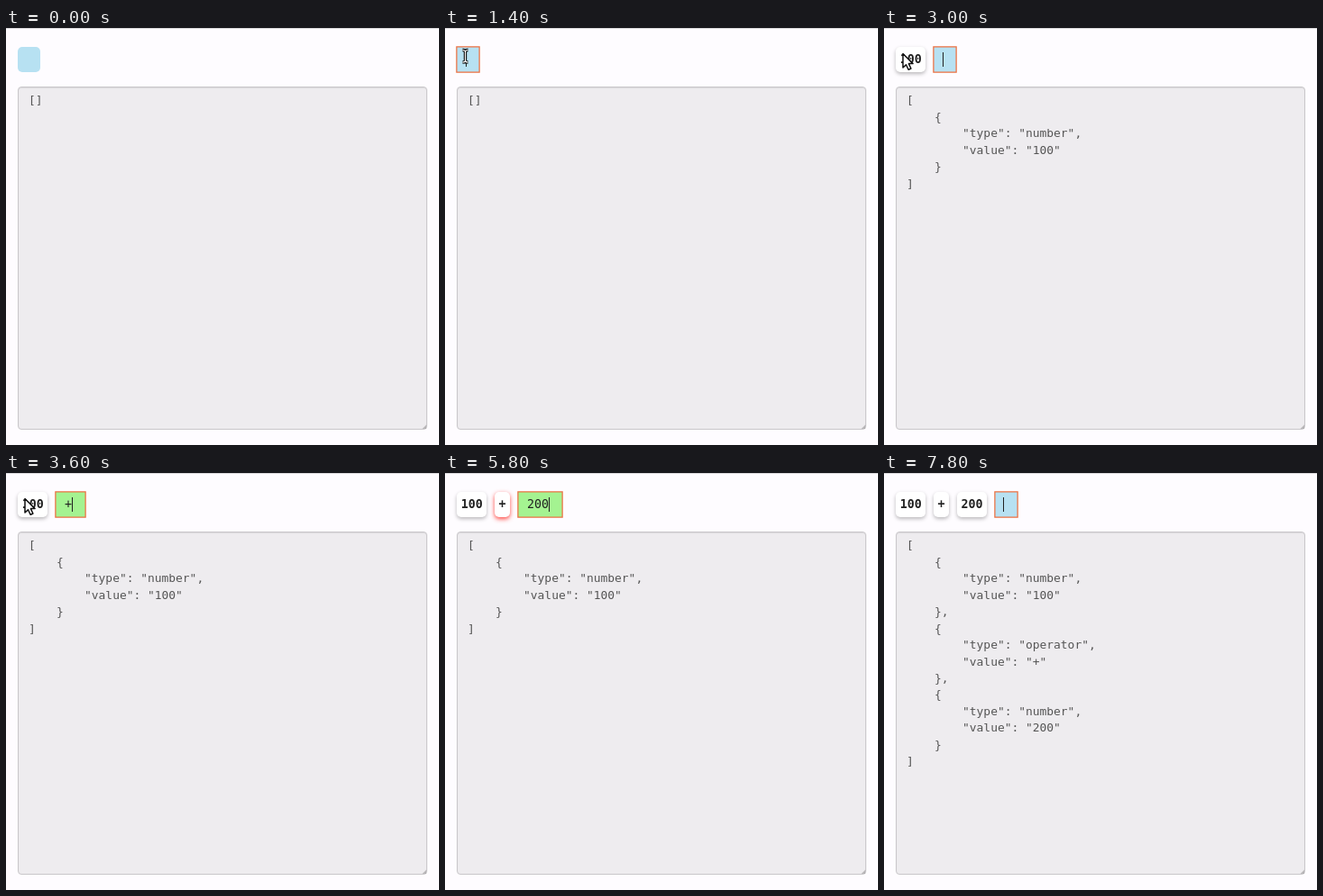
Animation of 480 by 463 pixels, one loop 8 s. Source, as an HTML page:

```html
<!DOCTYPE html>
<html lang="en">
<head>
<meta charset="utf-8">
<title>Formula field</title>
<style>
html, body { margin: 0; width: 100%; height: 100%; overflow: hidden; background: #fefcff; }
body { position: relative; font: 13.3px/28px "DejaVu Sans Mono", monospace; color: #222; }
body > * { position: absolute; box-sizing: border-box; }
#rule { left: 0; top: 0; width: 480px; height: 1px; background: #dcdadd; }
#row { left: 13.2px; top: 21px; display: flex; gap: 8.9px; }
.token { height: 28px; padding: 0 4.5px; border-radius: 5px; background: #fff; font-weight: bold;
  box-shadow: 0 2px 4px rgba(0, 0, 0, .27); }
.token.bad { box-shadow: 0 2px 5px rgba(255, 40, 30, .85); }
#field { position: relative; height: 28px; padding: 0 15px 0 10px; border-radius: 5px; white-space: pre; }
#field.focus { border-radius: 0; box-shadow: 0 0 0 .75px #ec7040, inset 0 0 0 .5px #ec7040; }
#caret { position: absolute; right: 14.5px; top: 6px; width: 1px; height: 16px; background: #222; }
#json { left: 13px; top: 65px; width: 454px; height: 381px; margin: 0; padding: 5.4px 10.9px;
  border: 1px solid #c9c7ca; border-radius: 4px; background: #eeecef; color: #555;
  box-shadow: inset 0 1px 1px rgba(0, 0, 0, .08); font: 12.92px/18.46px "DejaVu Sans Mono", monospace; }
svg { left: 0; top: 0; width: 480px; height: 463px; }
</style>
</head>
<body>
<div id="rule"></div>
<div id="row"></div>
<pre id="json"></pre>
<svg viewBox="0 0 480 463">
  <path d="M461.5 445L466 440.5V445Z" fill="#99979a" opacity=".6"/>
  <g id="pointer" stroke-linejoin="round">
    <path id="arrow" d="M-1.5 -2.5V13L2 9.7L4.6 15.3L7.4 14L4.9 8.6H9.6Z" fill="#fff" stroke="#111" stroke-width="1.5"/>
    <g id="beam" fill="none">
      <path id="stem" d="M-3 -6.5Q0 -6.5 0 -4.5Q0 -6.5 3 -6.5M0 -4.5V5M-3 7Q0 7 0 5Q0 7 3 7" stroke-width="3.4" stroke="#111"/>
      <path d="M-3 -6.5Q0 -6.5 0 -4.5Q0 -6.5 3 -6.5M0 -4.5V5M-3 7Q0 7 0 5Q0 7 3 7" stroke="#fff" stroke-width="1.1"/>
    </g>
  </g>
</svg>
<script>
const LOOP = 8000, STEP = 200, BLINK = 600;
const FOCUS = 1200, HIDE_POINTER = 3800;
const BLUE = [183, 225, 242], GREEN = [164, 243, 145];
const $ = id => document.getElementById(id);

// start: field opens, keys: time of each typed character, end: field becomes a token
const entries = [
  { type: "number", value: "100", start: FOCUS, keys: [2000, 2200, 2400], end: 3000, valid: 3000 },
  { type: "operator", value: "+", start: 3000, keys: [3400], end: 4600, valid: 6200 },
  { type: "number", value: "200", start: 4600, keys: [5200, 5400, 5600], end: 6200, valid: 6200 },
  { value: "", start: 6200, keys: [], end: Infinity, valid: Infinity }
];

function fieldHtml(entry, t) {
  const typed = entry.keys.filter(k => k <= t);
  const last = typed.length ? typed[typed.length - 1] : entry.start;
  const mix = typed.length ? Math.min(1, .5 + (t - typed[0]) / 400) : 0;
  const color = BLUE.map((c, i) => Math.round(c + (GREEN[i] - c) * mix));
  const caretOn = t >= FOCUS && Math.floor((t - last) / BLINK) % 2 === 0;
  return `<span id="field" class="${t >= FOCUS ? "focus" : ""}" style="background:rgb(${color})">` +
    entry.value.slice(0, typed.length) + (caretOn ? '<i id="caret"></i>' : "") + "</span>";
}

function drawPointer(t) {
  const p = Math.min(1, Math.max(0, (t - 200) / 1000));
  const rest = (1 - p) ** 2;
  const x = 22.5 + 275 * rest, y = 31 + 68 * rest;
  const overText = y > 65 || (x < 38 && t < entries[0].end);
  $("pointer").setAttribute("transform", `translate(${x} ${y})`);
  $("pointer").style.display = t >= 200 && t < HIDE_POINTER ? "" : "none";
  $("beam").style.display = overText ? "" : "none";
  $("arrow").style.display = overText ? "none" : "";
}

function draw(t) {
  const done = entries.filter(e => e.end <= t);
  $("row").innerHTML = done.map(e =>
    `<span class="token${e.valid > t ? " bad" : ""}">${e.value}</span>`).join("") +
    fieldHtml(entries[done.length], t);
  const output = done.filter(e => e.valid <= t).map(({ type, value }) => ({ type, value }));
  $("json").textContent = JSON.stringify(output, null, 4);
  drawPointer(t);
}

const origin = performance.now();
let shown = -1;
function tick() {
  const t = Math.floor((performance.now() - origin) % LOOP / STEP) * STEP;
  if (t !== shown) draw(shown = t);
  requestAnimationFrame(tick);
}
tick();
</script>
</body>
</html>
```
